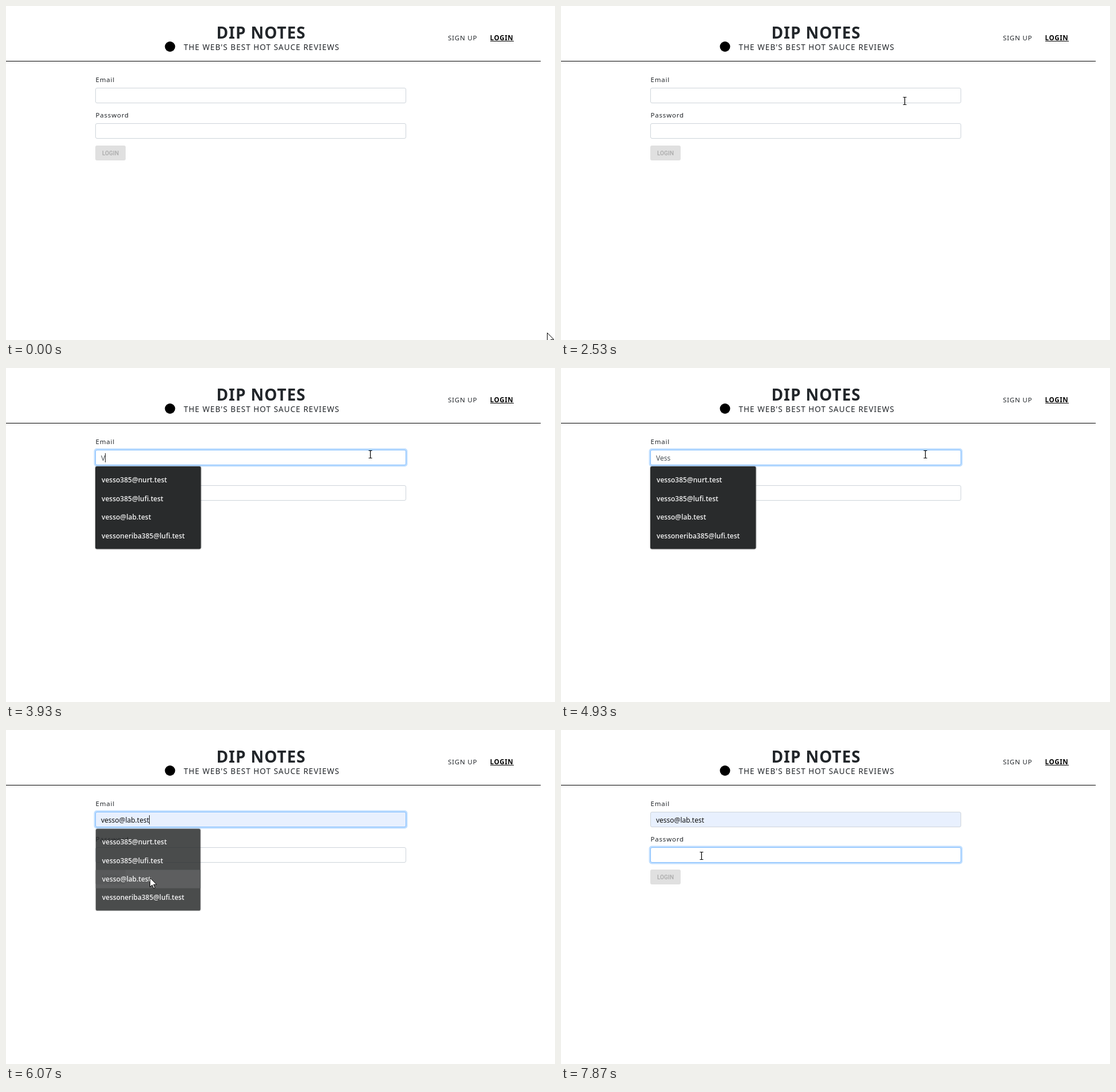
Write an HTML page that moves like this. It is 959 px wide and 584 px high and loops after 8000 ms.

```html
<!DOCTYPE html>
<html lang="en">
<head>
<meta charset="utf-8">
<title>Login form</title>
<style>
  html, body { margin: 0; width: 100%; height: 100%; overflow: hidden; background: #fff; }
  svg { display: block; width: 959px; height: 584px; }
  text { font: 12px "Noto Sans", "Open Sans", sans-serif; fill: #212529; white-space: pre; }
  .label { font-size: 11.5px; letter-spacing: .8px; }
  #popup text { font: 600 12px "Open Sans", "Noto Sans", sans-serif; fill: #f1f1f1; }
  .glow { fill: #bfdeff; }
</style>
</head>
<body>
<svg viewBox="0 0 959 584">
  <circle cx="286.5" cy="71" r="9"/>
  <text x="367.5" y="57" style="font-size:28px;font-weight:700;letter-spacing:.9px">DIP NOTES</text>
  <text x="310.5" y="77" style="font-size:13.5px;letter-spacing:1.05px">THE WEB'S BEST HOT SAUCE REVIEWS</text>
  <text class="label" x="772" y="60">SIGN UP</text>
  <rect id="signLine" x="772" y="61" width="52" height="1" fill="#212529"/>
  <text class="label" x="845.5" y="60" style="font-weight:700;letter-spacing:.65px;fill:#000">LOGIN</text>
  <rect x="846" y="61" width="41" height="1"/>
  <rect y="96" width="934" height="1"/>

  <text class="label" x="156.5" y="133">Email</text>
  <text class="label" x="156.5" y="195">Password</text>
  <rect class="glow" id="mailGlow" x="153.6" y="140.6" width="547.8" height="31.8" rx="5"/>
  <rect id="mailBox" x="156.5" y="143.5" width="542" height="26" rx="2.5"/>
  <rect class="glow" id="passGlow" x="153.6" y="202.6" width="547.8" height="31.8" rx="5"/>
  <rect id="passBox" x="156.5" y="205.5" width="542" height="26" rx="2.5" fill="#fff"/>
  <text id="mail" x="166" y="161.5"></text>
  <rect id="caret" width="1" fill="#222"/>

  <rect x="156" y="244" width="53" height="26" rx="3" fill="#e0e0e0"/>
  <text x="182.5" y="260.5" text-anchor="middle" style="font:500 10px Roboto,sans-serif;letter-spacing:.1px;fill:#a9a9a9">LOGIN</text>

  <g id="popup"></g>
  <g id="cursor">
    <path id="arrow" d="M.5.5V16.5L4.3 13 7 19 9.3 18 6.7 12.2H12z" fill="#fff" stroke="#000"/>
    <path id="hand" d="M-1.5 13V1.5a1.5 1.5 0 0 1 3 0V7.5q1.5-1 3 .5 1.5-.8 3 .7 2-.5 2 1.5V14q0 3-2 5v1.5h-7.5V19L-6 13q-1-2 1-2.5 1.5 0 3.5 2.5z" fill="#fff" stroke="#000"/>
    <path id="beam" d="M-2.5-6.5H3.5M.5-6.5V6.5M-2.5 6.5H3.5" fill="none" stroke="#000" stroke-width="1.2"/>
  </g>
</svg>
<script>
const LOOP = 8000, STEP = 1000 / 15, ROW = 32.5, FIRST_ROW = 179.5;
const $ = id => document.getElementById(id);
const set = (id, attrs) => { for (const k in attrs) $(id).setAttribute(k, attrs[k]); };
const show = (id, on) => { $(id).style.display = on ? '' : 'none'; };
const ramp = (t, start, length) => Math.min(1, Math.max(0, (t - start) / length));
const within = (v, a, b) => v >= a && v < b;

const CHOSEN = 'vesso@lab.test';
const ALL = {
  width: 217, height: 209,
  rows: ['rena58203@lufi.test', 'cite@lab.test', 'vesso385@nurt.test',
    'b.merallo2618@lufi.test', 'noel.farun@lufi.test', 'adrien.delcorvaniere@lufi.test']
};
const FILTERED = {
  width: 184.5, height: 144.5,
  rows: ['vesso385@nurt.test', 'vesso385@lufi.test', CHOSEN, 'vessoneriba385@lufi.test']
};

// time, x, y of the pointer
const PATH = [
  [0, 945, 571], [400, 720, 350], [870, 461, 159], [1200, 169, 252], [1530, 806, 60],
  [1600, 813, 58], [1730, 872, 51], [1800, 872, 51], [2200, 169, 252], [2600, 638, 158],
  [2930, 638, 158], [3270, 636, 151], [5340, 636, 151], [5530, 480, 127],
  [5730, 275, 235], [5870, 251, 258], [6270, 251, 258], [6600, 242, 220],
  [7200, 242, 220], [7330, 245, 220], [LOOP, 245, 220]
];
const KEYS = [3800, 4130, 4270, 4400];
const CARET_ON = [[2730, 3270], [3800, 4930], [5470, 5870], [6070, 6600], [7130, 7870]];

function pointer(t) {
  const i = PATH.findIndex(p => p[0] > t), a = PATH[i - 1], b = PATH[i];
  const k = ramp(t, a[0], b[0] - a[0]), e = k * k * (3 - 2 * k);
  return [a[1] + (b[1] - a[1]) * e, a[2] + (b[2] - a[2]) * e];
}

function drawPopup(list, alpha, hovered, closing) {
  show('popup', alpha > 0);
  const { width: w, height: h, rows } = list;
  const box = `x="156" y="172" width="${w}" height="${h}" rx="3"`;
  $('popup').innerHTML =
    `<rect ${box} fill="none" stroke="#000" stroke-opacity=".12" stroke-width="3"/>
     <rect ${box} fill="#292b2c"/>` +
    (hovered < 0 ? '' : `<rect x="156" y="${FIRST_ROW + hovered * ROW}" width="${w}" height="${ROW}" fill="#3f4142"/>`) +
    rows.map((s, i) => `<text x="167" y="${200 + i * ROW}">${s}</text>`).join('');
  const cx = 156 + w / 2, cy = 172 + h / 2, scale = closing ? .97 + .025 * alpha : 1;
  set('popup', {
    opacity: alpha,
    transform: `translate(${cx} ${cy}) scale(${scale}) translate(${-cx} ${-cy})`
  });
}

function draw(t) {
  const [x, y] = pointer(t);
  const list = t < 3930 ? ALL : FILTERED;
  const closing = t >= 6070;
  const alpha = closing ? 1 - ramp(t, 6040, 190) : ramp(t, 2690, 140);
  const overList = alpha > 0 && within(x, 156, 156 + list.width) && within(y, 172, 172 + list.height);
  const row = Math.floor((y - FIRST_ROW) / ROW);
  const hovered = overList && row >= 0 && row < list.rows.length ? row : -1;
  drawPopup(list, alpha, hovered, closing);

  // field content
  const filled = closing || hovered >= 0;
  const typed = 'Vess'.slice(0, KEYS.filter(k => t >= k).length);
  $('mail').textContent = closing ? CHOSEN : filled ? list.rows[hovered] : typed;
  $('mail').style.fill = filled ? '#111' : '#495057';

  // focus rings
  const moved = ramp(t, 7210, 150), mailFocus = ramp(t, 2670, 150) * (1 - moved);
  const border = f => f > .5 ? '#80bdff' : '#ced4da';
  set('mailGlow', { opacity: mailFocus });
  set('passGlow', { opacity: moved });
  set('mailBox', { stroke: border(mailFocus), fill: filled ? '#e8f0fe' : '#fff' });
  set('passBox', { stroke: border(moved) });

  const inPass = t >= 7270;
  const end = inPass ? 0 : $('mail').getComputedTextLength();
  show('caret', CARET_ON.some(([a, b]) => within(t, a, b)));
  set('caret', { x: Math.round(166 + end), y: inPass ? 211 : 149, height: inPass ? 15 : 16 });

  // pointer shape follows what lies under it
  const onSign = within(x, 770, 826) && within(y, 46, 66);
  const onLink = onSign || within(x, 844, 889) && within(y, 46, 66);
  const onField = !overList && within(x, 156, 699) && (within(y, 143, 170) || within(y, 205, 232));
  show('signLine', onSign);
  show('hand', onLink);
  show('beam', onField);
  show('arrow', !onLink && !onField);
  set('cursor', { transform: `translate(${Math.round(x)} ${Math.round(y)})` });
}

function frame() {
  const t = performance.now() % LOOP;
  draw(Math.min(LOOP - 10, Math.round(Math.floor((t + 5) / STEP) * STEP / 10) * 10));
  requestAnimationFrame(frame);
}
frame();
</script>
</body>
</html>
```
